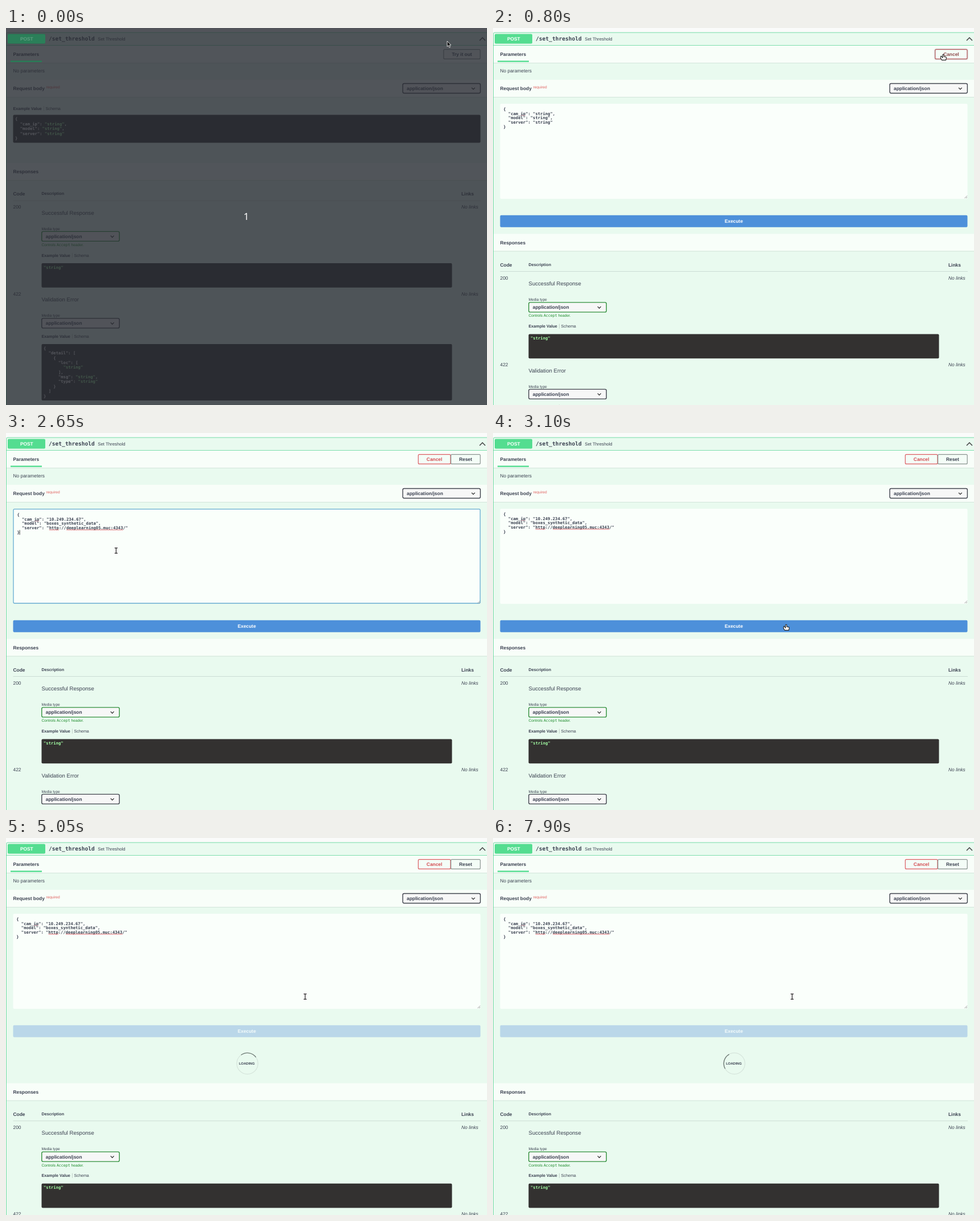
An HTML page that plays this animation: 845x662 px, repeating every 8000 ms.

```html
<!DOCTYPE html>
<html lang="en">
<head>
<meta charset="utf-8">
<title>Set Threshold</title>
<style>
html, body { margin: 0; width: 100%; height: 100%; overflow: hidden; background: #fafafa; }
svg { display: block; width: 845px; height: 662px; }
text { font-family: "Liberation Sans", Arial, sans-serif; fill: #3b4151; white-space: pre; text-rendering: geometricPrecision; }
.b { font-weight: 700; }
.i { font-style: italic; }
.mono { font-family: "DejaVu Sans Mono", monospace; font-weight: 700; }
.mid { text-anchor: middle; }
</style>
</head>
<body>
<svg id="stage" viewBox="0 0 845 662"></svg>
<script>
const LOOP = 8000;
const DARK = '#333130', INK = '#3b4151', BAR = '#f8fef9';

const rect = (x, y, w, h, fill, more = '') =>
  `<rect x="${x}" y="${y}" width="${w}" height="${h}" fill="${fill}" ${more}/>`;
const path = (d, stroke, width = 1, more = '') =>
  `<path d="${d}" fill="none" stroke="${stroke}" stroke-width="${width}" ${more}/>`;
const text = (x, y, str, size = 8.4, cls = '', fill = INK) =>
  `<text x="${x}" y="${y}" font-size="${size}" class="${cls}" style="fill:${fill}">${str}</text>`;
const group = (id, ...parts) => `<g id="${id}">${parts.join('')}</g>`;

const bar = (y, h) => rect(1, y, 844, h, BAR) + rect(1, y + h, 844, 1, '#d3e5da');

const button = (x, w, label, stroke, fill, more = '') =>
  rect(x, 37.6, w, 16.8, '#f4fdf7', `rx="2" stroke="${stroke}" stroke-width="1.2" ${more}`) +
  text(x + w / 2, 49, label, 8.4, 'b mid', fill);

const select = (x, y, stroke) =>
  rect(x, y, 136.4, 17, '#f7f7f7', `rx="2.4" stroke="${stroke}" stroke-width="1.4"`) +
  text(x + 7, y + 11.5, 'application/json', 8.4, 'b') +
  path(`M${x + 121} ${y + 7.3}l2.9 2.9 2.9-2.9`, '#222', 1.2);

const tabs = (x, y) =>
  text(x, y, 'Example Value', 7.2, 'b') + rect(x + 53.6, y - 6.7, 0.6, 8.4, '#a9b5b0') +
  text(x + 57, y, 'Schema', 7.2);

const lines = (x, y, pitch, rows, fill) =>
  rows.map((row, i) => text(x, y + i * pitch, row, 7.2, 'mono', fill)).join('');

const codeBox = (x, y, w, h, rows) =>
  rect(x, y, w, h, DARK, 'rx="2"') +
  lines(x + 3.5, y + 9.8, 8.37, rows.map(r =>
    r.replace(/"string"/g, '<tspan fill="#a2fca2">$&</tspan>')), '#fff');

const body = (ip, model, server) =>
  ['{', `  "cam_ip": "${ip}",`, `  "model": "${model}",`, `  "server": "${server}"`, '}'];
const sample = body('string', 'string', 'string');
const filled = body('10.249.234.67', 'boxes_synthetic_data', 'http://deeplearning05.muc:4343/');
const errorRows = ['{', '  "detail": [', '    {', '      "loc": [', '        "string"', '      ],',
  '      "msg": "string",', '      "type": "string"', '    }', '  ]', '}'];

const responseHead = (y, code, title) =>
  text(12.5, y, code) + text(800, y, 'No links', 8.4, 'i') +
  text(62.5, y + 10.3, title, 9.6) + text(62.5, y + 37.3, 'Media type', 6.6);

const wave = (x, w, y) => path(`M${x} ${y}h${w}`, '#d9555c', 0.9);

const header = group('header',
  rect(0, 0, 845, 662, '#fafbfa'),
  '<path d="M845 8H3Q.5 8 .5 10.5V662H845Z" fill="#e9faef"/>',
  rect(3, 10.5, 66, 17, '#54dd90', 'rx="2"'),
  text(36.3, 21.9, 'POST', 8.4, 'b mid', '#fff'),
  text(75, 22.3, '/set_threshold', 9.6, 'mono'),
  text(161.3, 21.6, 'Set Threshold', 7.8),
  path('M832 22l5-5 5 5', '#333', 1.3),
  bar(31, 30),
  rect(1, 30, 844, 1, '#7fdfae'),
  text(12.5, 49, 'Parameters', 8.4, 'b'),
  rect(8, 57.4, 55, 2.4, '#54dd90'),
  text(12.5, 77.6, 'No parameters'),
  bar(91, 30),
  text(12.5, 109, 'Request body', 8.4, 'b'),
  text(70.5, 105.6, 'required', 6.6, '', '#e0605f'),
  select(697, 97.5, '#41444e'));

const editor = group('editor',
  rect(12.5, 133, 821, 167, '#fafffb', 'rx="2"'),
  group('focus', rect(13, 133.7, 820, 165.3, 'none', 'rx="2" stroke="#64abd0" stroke-width="1.3"')),
  path('M828.5 299l4.5-4.5M831 299l2-2', '#777', 0.7),
  '<g id="words">',
  group('marked', ...[[0, 4.4], [1, 91], [2, 86.5], [3, 82.3], [4, 4.4]].map(([n, w]) =>
    rect(18.4, 138 + n * 7.8, w, 7.8, '#a9cbee'))),
  group('before', lines(18.2, 144.7, 7.8, sample, INK)),
  group('after', lines(18.2, 144.7, 7.8, filled, INK), wave(74.6, 17.3, 168.9), wave(105, 99.5, 168.9)),
  path('M49 153.6h8', '#c98b9a', 0.8),
  '</g>',
  group('caret', rect(23.6, 170.5, 0.9, 8.2, '#222')),
  group('run', rect(12.5, 328.8, 821, 21, '#4d90da', 'rx="2"'),
    text(423, 342, 'Execute', 8.4, 'b mid', '#fff')),
  group('ran', rect(12.5, 328.8, 821, 21, '#bad7e9', 'rx="2"'),
    text(423, 342, 'Execute', 8.4, 'b mid', '#f4fbfb')));

const loader = group('loader',
  '<circle cx="424" cy="396" r="18.6" fill="none" stroke="#d5e4db" stroke-width="1.2"/>',
  group('arc', path('M410.85 382.85A18.6 18.6 0 0 1 437.15 382.85', '#6e7a75', 1.4)),
  text(423, 397.6, 'LOADING', 6, 'b mid'));

const responses = group('responses',
  bar(237, 30),
  text(12.5, 255, 'Responses', 8.4, 'b'),
  text(12.5, 294, 'Code', 8.4, 'b'),
  text(62.5, 293.4, 'Description', 7.2, 'b'),
  text(800, 294, 'Links', 8.4, 'b'),
  rect(12.5, 302.7, 821.5, 0.8, '#c5d5cd'),
  responseHead(317.3, '200', 'Successful Response'),
  select(62.8, 357.4, '#2f8f3a'),
  text(62.5, 382.9, 'Controls <tspan style="font-family:\'DejaVu Sans Mono\',monospace">Accept</tspan> header.', 6.6, '', '#1c8a2a'),
  tabs(62.5, 401.6),
  codeBox(62.5, 413, 721, 42.8, ['"string"']),
  responseHead(469.8, '422', 'Validation Error'),
  select(62.8, 509.9, '#41444e'),
  tabs(62.5, 543.6),
  codeBox(62.5, 555, 721, 99, errorRows));

const dim = group('dim',
  rect(0, 0, 845, 662, 'rgba(40,43,50,.8)'),
  rect(3, 10.5, 66, 17, '#2b7f59', 'rx="2"'),
  text(36.3, 21.9, 'POST', 8.4, 'b mid', '#5f9d80'),
  rect(8, 57.4, 55, 2.4, '#2b7f59'),
  `<text x="422" y="337" font-size="17" class="mid" style="fill:#fff;font-family:'Noto Sans',sans-serif">1</text>`);

const ibeam = 'M-2.6-4.6h2q.6 0 .6.6 0-.6.6-.6h2M0-4v8M-2.6 4.6h2q.6 0 .6-.6 0 .6.6.6h2';
const cursor = group('cursor',
  group('arrow', '<path d="M0 0V9.6l2.2-2 1.6 3.6 1.7-.8-1.6-3.4h2.9Z" fill="#111" stroke="#fff" stroke-width=".8"/>'),
  group('hand', '<path d="M-1.1 1Q0-.6 1.1 1V4.2L4.6 4.9Q5.6 5.2 5.4 6.4L4.6 10.4H-2.4L-4.6 7.2Q-5-.0-1.1 6.4Z" fill="#fff" stroke="#222" stroke-width="1.1" stroke-linejoin="round"/>'),
  group('beam', path(ibeam, '#fff', 2.6) + path(ibeam, '#222', 1.2)));

const stage = document.getElementById('stage');
stage.innerHTML = header +
  group('tryOut', button(768.8, 64.2, 'Try it out', '#8a9390', INK)) +
  group('cancelHover', button(776.8, 56.2, 'Cancel', '#b5545a', '#8f4a4d',
    'style="filter:drop-shadow(0 0 1.2px rgba(0,0,0,.35))"')) +
  group('cancel', button(776.8, 56.2, 'Cancel', '#dc5c62', '#d44c53')) +
  group('cancelReset', button(724.3, 56.6, 'Cancel', '#dc5c62', '#d44c53'),
    button(781.6, 51.6, 'Reset', '#8a9390', INK)) +
  group('example', tabs(12.5, 143.8), codeBox(12.5, 152.6, 821, 48.8, sample)) +
  editor + loader + responses +
  path('M845 8H3Q.5 8 .5 10.5V662', '#74dba6') +
  dim + cursor;

const el = id => document.getElementById(id);
const show = (id, on) => { el(id).style.display = on ? '' : 'none'; };
const move = (id, x, y) => el(id).setAttribute('transform', `translate(${x} ${y})`);

// Pointer track: time, x, y, shape from that time on
const track = [
  [0, 775, 23, 'arrow'], [50, 775, 22.3, 'hand'], [350, 775, 22.3, 'hand'], [600, 791, 46, 'hand'],
  [850, 791, 46, 'arrow'], [900, 640, 70, 'arrow'], [1000, 28, 175, 'beam'], [1150, 4, 114, 'arrow'],
  [1200, 4, 114, 'arrow'], [1250, 60, 140, 'beam'], [1300, 110, 163, 'beam'], [1750, 110, 163, 'beam'],
  [2050, 144, 191, 'beam'], [2600, 144, 191, 'beam'], [2950, 490, 300, 'beam'], [3050, 515, 336, 'hand'],
  [3200, 515, 336, 'hand'], [3350, 525.5, 278.5, 'beam']];

function pointer(t) {
  let i = track.length - 1;
  while (track[i][0] > t) i--;
  const a = track[i], b = track[i + 1] || a;
  const k = b === a ? 0 : (t - a[0]) / (b[0] - a[0]);
  move('cursor', a[1] + (b[1] - a[1]) * k, a[2] + (b[2] - a[2]) * k);
  for (const shape of ['arrow', 'hand', 'beam']) show(shape, shape === a[3]);
}

function draw(now) {
  const t = Math.floor(now / 50) * 50;
  const trying = t >= 650, pasted = t >= 1800, loading = t >= 3150;
  const focused = t >= 1000 && t < 3100;

  show('dim', t < 50);
  show('tryOut', !trying);
  show('cancelHover', trying && t < 900);
  show('cancel', t >= 900 && !pasted);
  show('cancelReset', pasted);
  show('example', !trying);
  show('editor', trying);
  show('focus', focused);
  move('words', focused ? 1.2 : 0, focused ? 1.2 : 0);
  show('marked', t >= 1100 && !pasted);
  show('before', !pasted);
  show('after', pasted);
  show('caret', pasted && focused && (t < 2400 || (t >= 2650 && t < 2900)));
  show('run', !loading);
  show('ran', loading);
  show('loader', loading);
  move('responses', 0, loading ? 193.7 : trying ? 124.5 : 0);

  const step = Math.floor((t - 3550) / 66.7);
  el('arc').setAttribute('transform', `rotate(${26 + step * 48.3} 424 396)`);
  pointer(t);
}

const start = performance.now();
function tick() {
  draw((performance.now() - start) % LOOP);
  requestAnimationFrame(tick);
}
tick();
</script>
</body>
</html>
```
